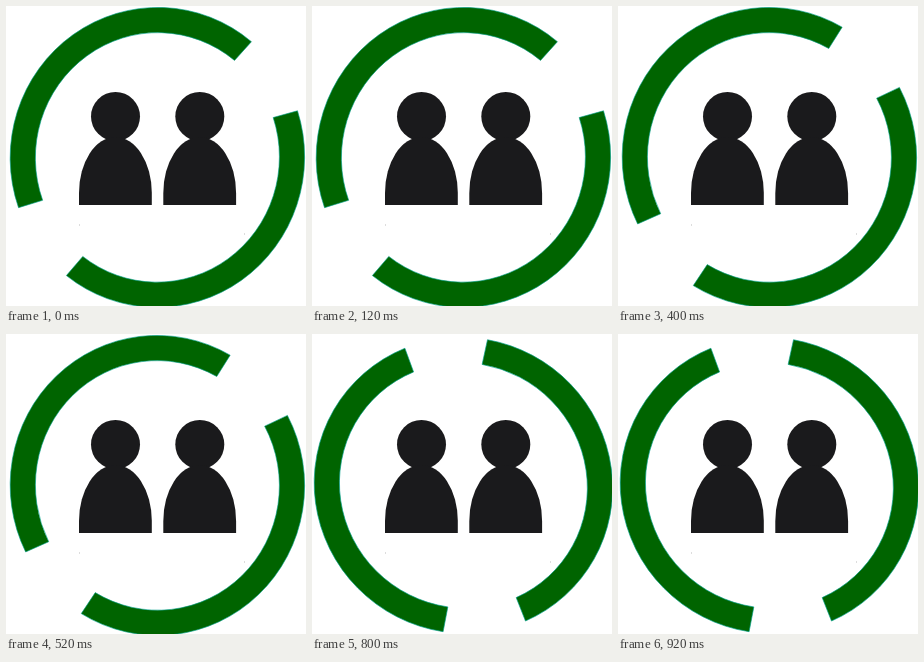
Write an HTML page that moves like this. It is 300 px wide and 300 px high and loops after 1 s.

```html
<!DOCTYPE html>
<html lang="en">
<head>
<meta charset="utf-8">
<title>Waiting pair</title>
<style>
  html, body { margin: 0; width: 100%; height: 100%; overflow: hidden; background: #fff; }
  svg { display: block; width: 100%; height: 100%; }
  #ring { fill: #006400; stroke: #00a08c; stroke-width: .6; }
  .person { fill: #1a1a1c; }
</style>
</head>
<body>
<svg viewBox="0 0 300 300">
  <path id="ring"/>
  <defs>
    <g id="person">
      <circle cx="109.5" cy="110.5" r="24.5"/>
      <path d="M73 199V187A36.4 56 0 0 1 145.8 187V199Z"/>
    </g>
  </defs>
  <use class="person" href="#person"/>
  <use class="person" href="#person" x="84.3"/>
  <g fill="#bbb">
    <rect x="73" y="218.5" width="1" height="1"/>
    <rect x="238" y="227.5" width="1" height="1"/>
  </g>
</svg>
<script>
  const STEP = 200;
  const CENTRE = 151.4;
  const RX = 150, RY = 147.2;   // slightly oval ring
  const THICK = 25.2;
  const SKEW = .3;              // slant of the arc ends, degrees
  const turns = [95, 185, 266.6, 312.6, 392.8];
  const ring = document.getElementById('ring');

  function onOval(rx, ry, deg) {
    const a = deg * Math.PI / 180, c = Math.cos(a), s = Math.sin(a);
    const r = rx * ry / Math.hypot(ry * c, rx * s);
    return (r * c).toFixed(2) + ' ' + (r * s).toFixed(2);
  }

  function arc(mid, half) {
    const rx = RX - THICK, ry = RY - THICK;
    const from = mid - half, to = mid + half;
    return `M${onOval(RX, RY, from + SKEW)}A${RX} ${RY} 0 0 1 ${onOval(RX, RY, to + SKEW)}` +
      `L${onOval(rx, ry, to - SKEW)}A${rx} ${ry} 0 0 0 ${onOval(rx, ry, from - SKEW)}Z`;
  }

  ring.setAttribute('d', arc(139.3, 74.5) + arc(-40.7, 73));

  const start = performance.now();
  function draw() {
    const i = Math.floor((performance.now() - start) / STEP) % turns.length;
    ring.setAttribute('transform', `translate(${CENTRE} ${CENTRE}) rotate(${turns[i]})`);
    requestAnimationFrame(draw);
  }
  draw();
</script>
</body>
</html>
```
